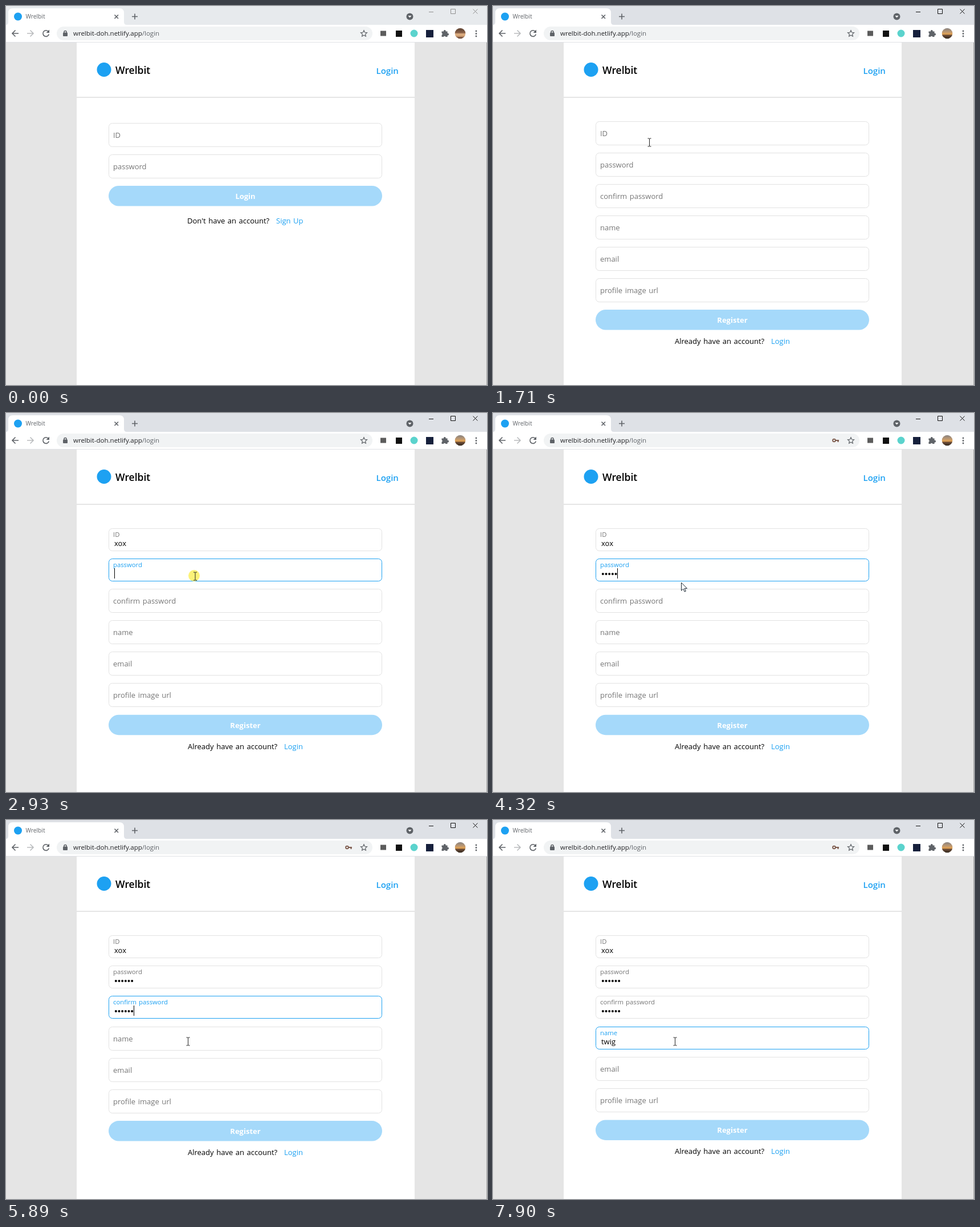
Animation, 844 px wide and 664 px high, one loop 8 s. Source, as an HTML page:

```html
<!DOCTYPE html>
<html lang="en">
<head>
<meta charset="utf-8">
<title>Wrelbit</title>
<style>
  html, body { margin: 0; width: 100%; height: 100%; overflow: hidden; }
  svg { display: block; width: 100vw; height: 100vh; background: #e5e5e5; }
  text { font: 13px "Open Sans", "Noto Sans", sans-serif; word-spacing: 1.2px; white-space: pre; }
  .strip { fill: #e7eaed; }
  .controls { stroke: #909090; fill: none; }
  .active .strip { fill: #dee1e6; }
  .active .controls { stroke: #111; }
  .icon { fill: none; stroke: #5f6368; stroke-width: 1.6; }
  .solid { fill: #5f6368; }
  .tab { font-size: 10.2px; fill: #5f6368; }
  .url { font-size: 11.5px; }
  .title { font-size: 17.5px; font-weight: 600; }
  .menu { font-size: 15px; font-weight: 600; }
  .link, .menu { fill: #1da1f2; }
  .field { fill: #fff; stroke: #e2e2e2; }
  .field.focus { stroke: #1da1f2; }
  .label { fill: #767676; }
  .small { font-size: 11.3px; }
  .label.focus { fill: #1da1f2; }
  .button { fill: #a5d9fa; }
  .caption { fill: #fff; font-weight: 700; text-anchor: middle; }
</style>
</head>
<body>
<svg id="stage" viewBox="0 0 844 664">
  <defs>
    <linearGradient id="warm" x2="0" y2="1">
      <stop offset=".15" stop-color="#684a38"/><stop offset=".45" stop-color="#8c6248"/>
      <stop offset=".55" stop-color="#dfb184"/><stop offset=".75" stop-color="#d2a174"/>
      <stop offset=".9" stop-color="#76513e"/>
    </linearGradient>
    <linearGradient id="dusk" x2="0" y2="1">
      <stop offset=".05" stop-color="#8d8580"/><stop offset=".4" stop-color="#c39a6e"/>
      <stop offset=".56" stop-color="#e5a452"/><stop offset=".68" stop-color="#6a4a35"/>
      <stop offset="1" stop-color="#33291f"/>
    </linearGradient>
  </defs>

  <!-- tab strip -->
  <rect class="strip" width="844" height="33"/>
  <path fill="#fff" d="M0 33Q4 33 4 28V12Q4 4 12 4H199Q207 4 207 12V28Q207 33 212 33Z"/>
  <circle cx="21" cy="18.5" r="7" fill="#1da1f2"/>
  <text class="tab" x="34.5" y="22">Wrelbit</text>
  <path class="icon" stroke-width="1.3" d="M190.5 15.5l6.5 6.5m0-6.5l-6.5 6.5M221 18.5h10m-5-5v10"/>
  <circle class="solid" cx="708.5" cy="18.5" r="6"/>
  <path fill="#fff" d="M705.5 17h6l-3 3.5Z"/>
  <path class="controls" d="M742 10.5h8M780.5 5.500h8v8h-8ZM819.500 5.500l8 8m0-8l-8 8"/>

  <!-- toolbar -->
  <rect y="33" width="844" height="31" fill="#fff"/>
  <rect y="63" width="844" height="1" fill="#dfe1e5"/>
  <rect x="89" y="36" width="554" height="24" rx="12" fill="#f1f3f4"/>
  <path class="icon" d="M22 48H11m5.500-5.500L11 48l5.500 5.500"/>
  <path class="icon" style="stroke:#babcbe" d="M37 48h11m-5.500-5.500L48 48l-5.500 5.500"/>
  <path class="icon" d="M74.500 45A5.300 5.300 0 1 0 75.300 49.500"/>
  <path class="solid" d="M76 41.500v5.500h-5.500Z"/>
  <rect class="solid" x="100" y="46.500" width="8" height="6.500" rx="1"/>
  <path class="icon" stroke-width="1.300" d="M102 47v-1.500a2 2 0 0 1 4 0V47"/>
  <text class="url" x="118" y="52"><tspan fill="#202124">wrelbit-doh.netlify.app</tspan><tspan fill="#5f6368">/login</tspan></text>
  <g id="key" fill="none" stroke="#7d5a4c">
    <circle cx="598.500" cy="48" r="2.400" stroke-width="1.800"/>
    <path stroke-width="2" d="M601 48h6m-1.500 0v3"/>
  </g>
  <path class="icon" style="stroke-width:1.200" d="M628 42.800l1.600 3.500 3.900.4-2.900 2.600.8 3.800-3.400-1.900-3.400 1.900.8-3.800-2.900-2.600 3.900-.4Z"/>
  <rect x="657" y="43.500" width="10" height="9" fill="#5c5c5c"/>
  <rect x="684" y="43" width="11" height="11" fill="#111"/>
  <circle cx="716" cy="48" r="6.500" fill="#5bd3cd"/>
  <rect x="737" y="42" width="13" height="13" fill="#16203c"/>
  <path class="solid" d="M764.500 44.500h3.500a1.900 1.900 0 1 1 3.600 0h3v3.300a1.900 1.900 0 1 1 0 3.600v2.600h-3.300a1.800 1.800 0 0 0-3.400 0h-3.400v-3.300a1.800 1.800 0 0 0 0-3.400Z"/>
  <circle id="avatar" cx="797" cy="48" r="9.300"/>
  <g class="solid"><circle cx="825" cy="44" r="1.400"/><circle cx="825" cy="48.500" r="1.400"/><circle cx="825" cy="53" r="1.400"/></g>

  <!-- page -->
  <rect x="124" y="64" width="593" height="600" fill="#fff"/>
  <rect x="124" y="159" width="593" height="2" fill="#e5e5e5"/>
  <circle cx="172" cy="111.500" r="12.500" fill="#1da1f2"/>
  <text class="title" x="192" y="119">Wrelbit</text>
  <text class="menu" x="649.500" y="119">Login</text>
  <rect x="843" y="64" width="1" height="600" fill="#a8a8a8"/>
  <g id="form"></g>
  <g id="pointer"></g>
</svg>

<script>
const LOOP = 8000, ACTIVATED = 1020, PAGE_SWITCH = 1160, KEY_SHOWN = 3320;
const DOT_STEP = 5.67;
const $ = id => document.getElementById(id);
const measure = document.createElement('canvas').getContext('2d');

// focus: when the field is entered; typed: when each character appears
const loginFields = [{ label: 'ID' }, { label: 'password' }];
const registerFields = [
  { label: 'ID', focus: 1920, text: 'xox', typed: [2330, 2520, 2670] },
  { label: 'password', focus: 2930, secret: true, typed: [3320, 3450, 3650, 4050, 4320, 4390] },
  { label: 'confirm password', focus: 4670, secret: true, typed: [4890, 5090, 5220, 5480, 5550, 5680] },
  { label: 'name', focus: 6020, text: 'twig', typed: [6770, 7170, 7440, 7570] },
  { label: 'email' },
  { label: 'profile image url' }
];
const loginPage = { top: 205, fields: loginFields, button: 'Login',
  note: ["Don't have an account?", 318], link: ['Sign Up', 474], noteGap: 66 };
const registerPage = { top: 202, fields: registerFields, button: 'Register',
  note: ['Already have an account?', 319], link: ['Login', 488], noteGap: 60 };

const caretOff = [[6360, 6630], [7900, LOOP]];
const presses = [[1020, 1160], [1850, 2000], [2930, 3060], [4600, 4820], [6020, 6090]];
const path = [ // time, x, y
  [70, 654, 617], [200, 565, 480], [340, 470, 374], [410, 446, 366], [550, 486, 374],
  [740, 486, 374], [890, 491, 376], [1160, 491, 376], [1500, 281, 258], [1560, 281, 258],
  [1710, 274.5, 239], [2600, 274.5, 239], [2730, 332, 286], [4300, 332, 286],
  [4320, 330.5, 297], [4390, 330, 305], [4520, 326, 339], [5620, 326, 339], [5890, 319.5, 388]
];

const shapes = {
  arrow: '<path fill="#fff" stroke="#1b2733" d="M0 0V14L3.300 11 5.700 16 7.800 15 5.500 10.200H10Z"/>',
  beam: '<path fill="none" stroke="#222" d="M-3 -7h2.500L0 -6.500 .5 -7H3M0 -6.500V6.500M-3 7h2.500L0 6.500 .5 7H3"/>',
  hand: '<path fill="#fff" stroke="#1b2733" stroke-linejoin="round" d="M-1.500 1Q0 -1.500 1.500 1V6Q3.500 5 4.200 7 6 6 6.500 8 8.500 7.500 8.500 9.500V13Q8.500 15 7 17V19H-.5V17L-4.500 11.500Q-5.500 9 -3.500 9.300L-1.500 11Z"/>'
};

const within = (t, spans) => spans.some(([from, to]) => t >= from && t < to);
const text = (cls, x, y, content) => `<text class="${cls}" x="${x}" y="${y}">${content}</text>`;

function drawField(field, y, t, focused) {
  const floated = t >= field.focus, height = floated ? 39 : 41;
  const mark = focused ? 'focus' : '';
  let out = `<rect class="field ${mark}" x="180.5" y="${y + .5}" width="479" height="${height}" rx="6"/>`;
  if (!floated) return out + text('label', 188, y + 25.7, field.label);

  out += text(`label small ${mark}`, 188, y + 14.5, field.label);
  const count = field.typed.filter(time => t >= time).length;
  let width = count * DOT_STEP;
  if (field.secret) {
    for (let i = 0; i < count; i++)
      out += `<circle cx="${190 + (i + .5) * DOT_STEP}" cy="${y + 27}" r="2"/>`;
  } else {
    const value = field.text.slice(0, count);
    measure.font = '13px "Open Sans", "Noto Sans", sans-serif';
    width = measure.measureText(value).width;
    out += text('', 190, y + 30.6, value);
  }
  if (focused && !within(t, caretOff))
    out += `<rect x="${Math.floor(190 + width)}" y="${y + 17}" width="1" height="18"/>`;
  return out;
}

function drawForm(page, t) {
  const current = page.fields.filter(field => t >= field.focus).pop();
  const boxes = [];
  let y = page.top, out = '';
  for (const field of page.fields) {
    const top = Math.floor(y), floated = t >= field.focus;
    out += drawField(field, top, t, field === current);
    boxes.push([top, top + (floated ? 40 : 42)]);
    y += floated ? 53.35 : 55;
  }
  out += `<rect class="button" x="180" y="${y}" width="480" height="35.5" rx="17.75"/>`
    + text('caption', 420, y + 23, page.button)
    + text('', page.note[1], y + page.noteGap, page.note[0])
    + text('link', page.link[1], y + page.noteGap, page.link[0]);
  $('form').innerHTML = out;
  return boxes;
}

function pointerAt(t) {
  const next = path.findIndex(point => point[0] > t);
  if (next < 0) return path.at(-1).slice(1);
  const [t0, x0, y0] = path[next - 1], [t1, x1, y1] = path[next];
  const k = (t - t0) / (t1 - t0);
  return [x0 + (x1 - x0) * k, y0 + (y1 - y0) * k];
}

function drawPointer(page, boxes, t) {
  if (t < path[0][0]) return '';
  const [x, y] = pointerAt(t);
  const onLink = page === loginPage && x > 472 && x < 525 && y > 366 && y < 388;
  const inField = x > 180 && x < 660 && within(y, boxes);
  const shape = onLink ? 'hand' : inField ? 'beam' : 'arrow';
  const halo = within(t, presses) ? `<circle cx="${x - 2}" cy="${y - 1}" r="10" fill="#fcf060" opacity=".85"/>` : '';
  return `${halo}<g transform="translate(${x} ${y})">${shapes[shape]}</g>`;
}

function render(t) {
  const page = t < PAGE_SWITCH ? loginPage : registerPage;
  const active = t >= ACTIVATED;
  $('stage').classList.toggle('active', active);
  $('avatar').setAttribute('fill', active ? 'url(#dusk)' : 'url(#warm)');
  $('key').setAttribute('visibility', t >= KEY_SHOWN ? 'visible' : 'hidden');
  const boxes = drawForm(page, t);
  $('pointer').innerHTML = drawPointer(page, boxes, t);
}

const start = performance.now();
function tick() {
  render((performance.now() - start) % LOOP);
  requestAnimationFrame(tick);
}
tick();
</script>
</body>
</html>
```
